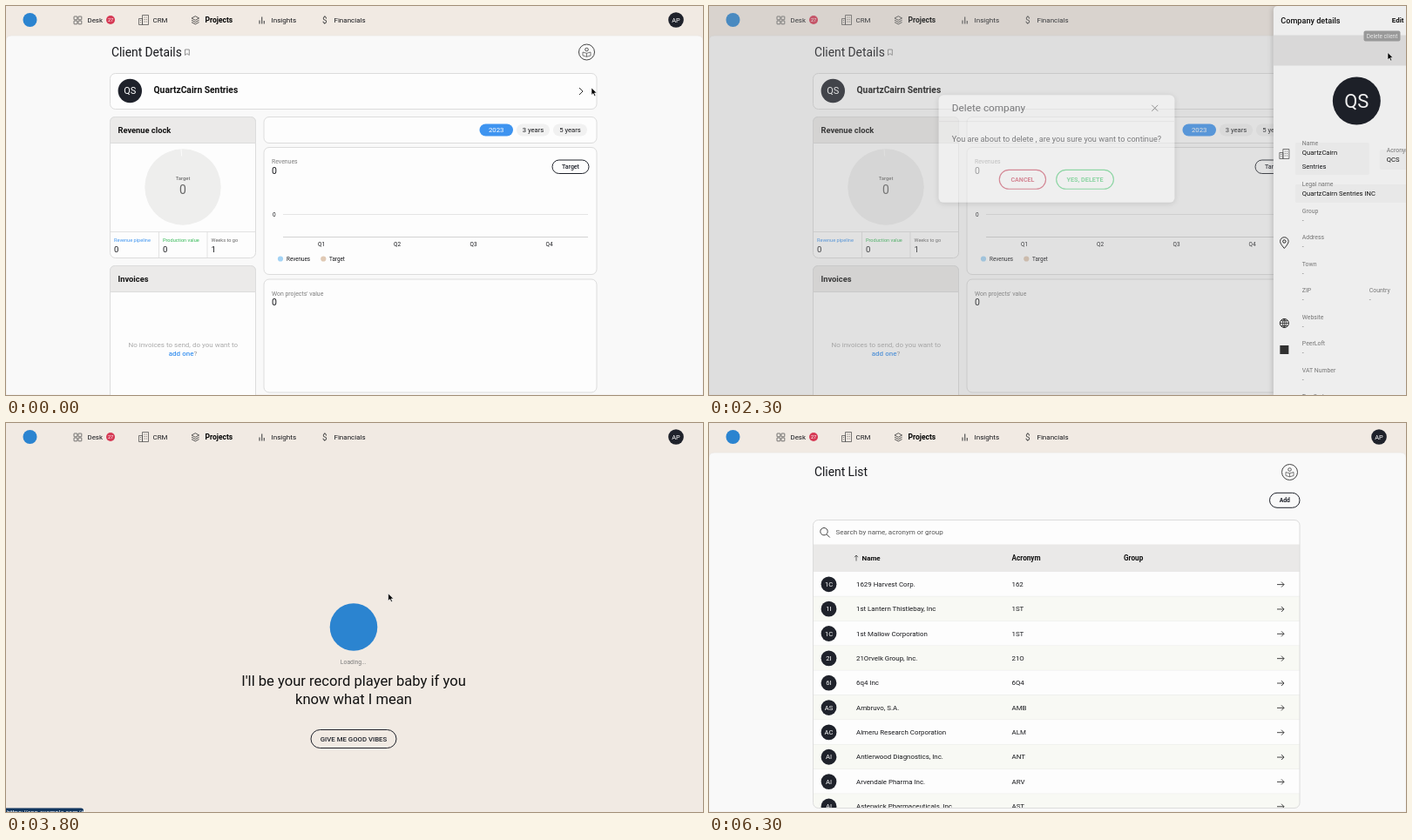
An HTML page that plays this animation: 800 by 447 pixels, repeating every 6.4 s.

```html
<!DOCTYPE html>
<html lang="en">
<head>
<meta charset="utf-8">
<title>Client details</title>
<style>
html, body { margin: 0; width: 100%; height: 100%; overflow: hidden; background: #f1eae3; }
svg { display: block; width: 100%; height: 100%; font-family: Roboto, "Open Sans", sans-serif; }
#drawer, #modal { filter: drop-shadow(0 1px 3px rgba(0,0,0,.25)); }
</style>
</head>
<body>
<svg id="stage" viewBox="0 0 800 447"></svg>
<script>
const INK = '#1f222b', GREY = '#7d7d7d', BLUE = '#3e94f0', LINE = '#dcdcdc', CARD = '#fdfdfd';
const LOOP = 6400, STEP = 100;
const company = 'QuartzCairn Sentries';

// drawing helpers
const text = (x, y, s, size = 7.6, fill = '#17181c', weight = 400, anchor = 'start') =>
  `<text x="${x}" y="${y}" font-size="${size}" fill="${fill}" font-weight="${weight}" text-anchor="${anchor}">${s}</text>`;
const mid = (x, y, s, size, fill, weight) => text(x, y, s, size, fill, weight, 'middle');
const rect = (x, y, w, h, r = 0, fill = CARD, stroke = 'none', sw = 1) =>
  `<rect x="${x}" y="${y}" width="${w}" height="${h}" rx="${r}" fill="${fill}" stroke="${stroke}" stroke-width="${sw}"/>`;
const disc = (x, y, r, fill, stroke = 'none') =>
  `<circle cx="${x}" cy="${y}" r="${r}" fill="${fill}" stroke="${stroke}"/>`;
const path = (d, stroke = '#333', sw = .8, fill = 'none') =>
  `<path d="${d}" fill="${fill}" stroke="${stroke}" stroke-width="${sw}" stroke-linejoin="round"/>`;
const card = (x, y, w, h) => rect(x, y, w, h, 6, CARD, LINE);
const cardHead = (x, y, w, h) =>
  path(`M${x} ${y + h}v${6 - h}q0-6 6-6h${w - 12}q6 0 6 6v${h - 6}z`, LINE, 1, '#ebeae9');
const avatar = (x, y, r, s, size) => disc(x, y, r, INK) + mid(x, y + size * .36, s, size, '#fff');
const cross = (x, y, r) => path(`M${x - r} ${y - r}l${2 * r} ${2 * r}m0 ${-2 * r}l${-2 * r} ${2 * r}`);
const pill = (x, y, w, h, s, size, color, weight = 500) =>
  rect(x, y, w, h, h / 2, 'none', color) + mid(x + w / 2, y + h / 2 + size * .36, s, size, color, weight);
const trash = (x, y) =>
  path(`M${x - 5} ${y - 4}h10M${x - 2} ${y - 4}v-1.7h4v1.7M${x - 4} ${y - 4}l.6 9.5h6.8l.6-9.5`);
const building = (x, y) =>
  path(`M${x} ${y + 11}v-7h4v7zM${x + 4} ${y + 11}v-11h7v11zM${x + 1.4} ${y + 6}h1.2m-1.2 2.4h1.2`
    + `M${x + 6} ${y + 2.5}h1m1.2 0h1m-3.2 2.5h1m1.2 0h1m-3.2 2.5h1m1.2 0h1`, '#444', .7);
const profile = y => disc(666.5, y, 9, 'none', '#444') + disc(666.5, y - 3, 1.8, 'none', '#555')
  + path(`M662 ${y}l4.5 1.3 4.5-1.3v4l-4.5 1.3-4.5-1.3zm4.5 1.3v4`, '#444', .7);
const group = (id, body) => `<g id="${id}">${body}</g>`;
const sheet = path('M0 447V40q0-6 6-6h788q6 0 6 6v407z', '#e8e3dd', .6, '#f9f9f9');

const nav = () => disc(27.5, 16, 8, '#2b84d0')
  + [[78, 12], [83, 12], [78, 17], [83, 17]].map(([x, y]) => rect(x, y, 3.8, 3.8, .4, 'none', '#555', .8)).join('')
  + text(93.5, 18.8, 'Desk', 7.9) + disc(120, 16, 5, '#d63a55') + mid(120, 18, '27', 5.5, '#fff')
  + building(152.5, 10.5) + text(168.5, 18.8, 'CRM', 7.9)
  + path('M213 14l4.3-2.3 4.3 2.3-4.3 2.3zM213 16.3l4.3 2.3 4.3-2.3M213 18.6l4.3 2.3 4.3-2.3')
  + text(228.5, 18.8, 'Projects', 8.5, '#000', 700)
  + path('M291 20.5v-4m2.7 4v-8m2.6 4.5v3.5', '#555', 1.2) + text(304.5, 18.8, 'Insights', 8.1)
  + text(363, 20, '$', 10, '#444') + text(376.5, 18.8, 'Financials', 8)
  + avatar(769, 16, 8.8, 'AP', 7.4);

function details() {
  const quarters = [362, 449, 536.5, 623.5].map((x, i) => mid(x, 276, 'Q' + (i + 1), 6.4)).join('');
  const stats = [[124, 'Revenue pipeline', BLUE, 0], [180, 'Production value', '#35b957', 0], [235.5, 'Weeks to go', '#666', 1]]
    .map(([x, s, c, v]) => text(x, 271, s, 5.6, c) + text(x, 283.3, v, 9.5)).join('');
  return sheet + text(121, 58, 'Client Details', 13.8) + path('M205.5 50h4.8v6.5l-2.4-1.8-2.4 1.8z', '#777') + profile(53)
    + card(119.5, 77.5, 558.5, 41) + avatar(142.3, 97.5, 13.7, 'QS', 11)
    + text(169.5, 100.3, company, 10.3, '#111', 600) + path('M658 94l4 4-4 4', '#333', 1)
    + card(119.5, 127.5, 167, 162) + cardHead(119.5, 127.5, 167, 30) + text(128.5, 145.8, 'Revenue clock', 9.3, '#111', 700)
    + disc(203, 208, 43.7, '#eeeeed') + path('M201 164.5l.7 8', '#fff', .8)
    + mid(203, 200, 'Target', 5.9, '#555') + mid(203, 216.3, '0', 14, '#666')
    + path('M120 259.5h166M175.5 259.5v30M231 259.5v30', LINE) + stats
    + card(119.5, 298.5, 167, 160) + cardHead(119.5, 298.5, 167, 30) + text(128.5, 316.8, 'Invoices', 9.3, '#111', 700)
    + mid(203.3, 392, 'No invoices to send, do you want to', 8, '#aaa')
    + mid(203, 402, `<tspan fill="${BLUE}" font-weight="500">add one</tspan>?`, 8, '#999')
    + card(296, 127.5, 382, 30) + rect(543.5, 135.5, 38.5, 14, 7, BLUE) + mid(562.7, 145.2, '2023', 7.8, '#fff')
    + rect(586, 135.5, 38, 14, 7, '#f1f1f1') + mid(605, 145.2, '3 years', 7.7)
    + rect(628, 135.5, 39, 14, 7, '#f1f1f1') + mid(647.5, 145.2, '5 years', 7.7)
    + card(296, 162.5, 382, 146) + text(305, 181, 'Revenues', 6.9, GREY) + text(305, 192.6, '0', 10.5)
    + pill(627, 177, 42, 15.5, 'Target', 7, INK)
    + text(306, 242, '0', 6.4) + path('M318 239.5h350', '#e0e0e0') + path('M318 265.5h350', '#c9c9c9') + quarters
    + disc(315, 290.5, 3.1, '#a3d3f5') + text(322, 292.8, 'Revenues', 6.3)
    + disc(364.3, 290.5, 3.1, '#e0c9b4') + text(371, 292.8, 'Target', 6.3)
    + card(296, 314, 382, 130) + text(305, 332.5, "Won projects' value", 6.9, GREY) + text(305, 344.3, '0', 10.5);
}

function drawer() {
  const field = (x, y, s, v = '-') => text(x, y, s, 6.9, GREY) + text(x, y + 11, v, v === '-' ? 6.9 : 7.6, v === '-' ? GREY : '#111');
  const [first, second] = company.split(' ');
  return path('M609 447V5q0-5 5-5h186v447z', 'none', 0, CARD) + rect(609, 33.5, 191, 35, 0, '#e6e5e5')
    + text(617.5, 20, 'Company details', 9.1, '#111', 500) + text(745, 19.3, 'Edit', 7.9, '#111', 600)
    + cross(787, 17, 4) + trash(787, 52) + avatar(704.5, 109, 27.5, 'QS', 22)
    + rect(634, 157, 85, 37, 2, '#f6f6f6') + rect(731, 165, 62, 23, 2, '#f6f6f6') + rect(634, 205, 159, 21, 2, '#f6f6f6')
    + building(616, 164.5) + field(642, 160, 'Name', first) + text(642, 187, second)
    + field(739, 168.3, 'Acronym', 'QCS') + field(642, 207, 'Legal name', company + ' INC')
    + ['Group', 'Address', 'Town', 'ZIP', 'Website', 'PeerLoft', 'VAT Number', 'Tax Code']
      .map((s, i) => field(642, 237.5 + i * 30.55, s)).join('')
    + field(719, 329.2, 'Country')
    + path('M621.5 278.5q-4.8-5.5-4.8-8a4.8 4.8 0 0 1 9.6 0q0 2.5-4.8 8z', '#222', .9) + disc(621.5, 270.5, 1.7, 'none', '#222')
    + disc(621.5, 364.5, 5, 'none', '#222')
    + path('M621.5 359.5v10M616.5 364.5h10M617.5 361.7h8M617.5 367.3h8M621.5 359.5q-4.5 5 0 10q4.5-5 0-10', '#222', .7)
    + rect(616.5, 390, 10, 10, 0, '#333');
}

const modal = () => rect(279.5, 109.5, 239, 109, 5) + path('M279.5 136.3h239', '#e6e6e6')
  + text(293, 126.3, 'Delete company', 10.4) + cross(498.5, 122.8, 3.1)
  + text(293, 156.8, 'You are about to delete , are you sure you want to continue?', 8.07)
  + pill(341, 185.5, 47, 19.3, 'CANCEL', 6.3, '#c8304b', 600) + pill(398.7, 185.5, 58, 19.3, 'YES, DELETE', 6.4, '#3bcb68', 600);

const loading = () => rect(0, 34, 800, 413, 0, '#f1eae3') + disc(399, 234.5, 27.3, '#2b84d0')
  + mid(398.7, 276.5, 'Loading...', 6.8, GREY)
  + mid(399, 302, "I'll be your record player baby if you", 16.6, '#111') + mid(399, 323, 'know what I mean', 16.6, '#111')
  + pill(350, 352.5, 98, 21, 'GIVE ME GOOD VIBES', 7.8, INK);

function list() {
  const rows = [
    ['1C', '1629 Harvest Corp.', '162'], ['1I', '1st Lantern Thistlebay, Inc', '1ST'],
    ['1C', '1st Mallow Corporation', '1ST'], ['2I', '21Orvelk Group, Inc.', '21O'],
    ['6I', '6q4 Inc', '6Q4'], ['AS', 'Ambruvo, S.A.', 'AMB'],
    ['AC', 'Almeru Research Corporation', 'ALM'], ['AI', 'Antlerwood Diagnostics, Inc.', 'ANT'],
    ['AI', 'Arvendale Pharma Inc.', 'ARV'], ['AI', 'Asterwick Pharmaceuticals, Inc.', 'AST']
  ].map(([tag, name, code], i) => {
    const y = 171 + i * 28.35, c = y + 14.3;
    return rect(120, y, 558, 28.35, 0, i % 2 ? '#f8f9f4' : CARD) + path(`M120 ${y + 28.35}h558`, '#e4e4e2')
      + avatar(137.5, c, 8.9, tag, 7.6) + text(169, c + 2.6, name, 7.9) + text(347.5, c + 2.6, code, 7.9)
      + path(`M652 ${c + .3}h8m-3-3l3 3-3 3`, '#333', .9);
  }).join('');
  return sheet + text(121, 61.3, 'Client List', 13.8) + profile(56.5) + pill(643.5, 80.3, 34.5, 17, 'Add', 6.8, INK, 600)
    + '<clipPath id="table"><rect x="119" y="111" width="560" height="331.5" rx="6"/></clipPath><g clip-path="url(#table)">'
    + rect(119.5, 111.5, 558.5, 40, 6) + rect(120, 139.5, 558, 31.5, 0, '#eae9e8')
    + disc(132, 124.7, 4.2, 'none', '#444') + path('M135 127.8l3.7 3.7', '#444', 1)
    + text(145.5, 128.4, 'Search by name, acronym or group', 8, '#555')
    + path('M169 158.5v-6.5m-2 2.2l2-2.2 2 2.2', '#444') + text(175.5, 158, 'Name', 8, '#111', 700)
    + text(347.5, 158, 'Acronym', 8.2, '#111', 700) + text(476, 158, 'Group', 8.2, '#111', 700) + rows + '</g>'
    + rect(119.5, 111.5, 558.5, 331, 6, 'none', LINE) + group('rowTrash', trash(629.5, 186));
}

// the shade lies above the drawer, the veil below it
const stage = document.getElementById('stage');
stage.innerHTML = rect(0, 0, 800, 447, 0, '#f1eae3') + nav()
  + group('details', details()) + group('list', list()) + group('loading', loading())
  + group('veil', rect(0, 0, 800, 447, 0, '#bebebe')) + group('drawer', drawer())
  + group('shade', rect(0, 0, 800, 447, 0, '#000'))
  + group('tip', rect(751.5, 28.5, 42, 12, 2, '#999') + mid(772.5, 37, 'Delete client', 6.5, '#e8e8e8'))
  + group('modal', modal())
  + group('status', path('M0 442.5h86q3 0 3 3v2H0z', 'none', 0, '#12365e') + text(1, 450, 'https://app.example.com/#', 7.3, '#fff'))
  + group('cursor', path('M0 0v8.3l2-1.8 1.4 3 1.4-.6-1.4-3h2.7z', '#fff', .6, '#000'));

const el = {};
stage.querySelectorAll('g[id]').forEach(g => el[g.id] = g);
const clamp = v => Math.max(0, Math.min(1, v));
const span = (t, from, to) => clamp((t - from) / (to - from));
const show = (g, on) => g.setAttribute('opacity', +on);
const within = (t, from, to) => t >= from && t < to;

// time, x, y of the pointer
const route = [[0, 672, 94], [700, 663, 98], [1400, 663, 98], [1800, 785, 50], [2200, 780, 53], [2400, 778, 54],
  [2700, 624, 121], [3100, 438.7, 196], [LOOP, 438.7, 196]];
function pointer(t) {
  const i = route.findIndex(k => k[0] > t), a = route[i - 1], b = route[i], p = span(t, a[0], b[0]);
  return [1, 2].map(k => a[k] + (b[k] - a[k]) * p);
}

function draw() {
  const t = Math.floor(performance.now() % LOOP / STEP) * STEP;
  const open = 1 - (1 - span(t, 700, 1050)) ** 3 - span(t, 2200, 2500) ** 1.45;
  const asking = t < 3600, fade = asking ? span(t, 2200, 2400) : 0;
  const size = 1.2 - .2 * span(t, 2200, 2500);
  show(el.details, asking);
  show(el.loading, within(t, 3600, 4800));
  show(el.list, t >= 4800);
  show(el.rowTrash, within(t, 4800, 5900));
  show(el.veil, .3 * open);
  show(el.shade, .12 * fade);
  show(el.drawer, open > 0);
  el.drawer.setAttribute('transform', `translate(${191 * (1 - open)} 0)`);
  show(el.tip, within(t, 1900, 2400));
  show(el.modal, fade);
  el.modal.setAttribute('transform', `translate(399 163.7) scale(${size}) translate(-399 -163.7)`);
  show(el.status, within(t, 3100, 4300));
  show(el.cursor, t < 5900);
  el.cursor.setAttribute('transform', `translate(${pointer(t)})`);
  requestAnimationFrame(draw);
}
draw();
</script>
</body>
</html>
```
